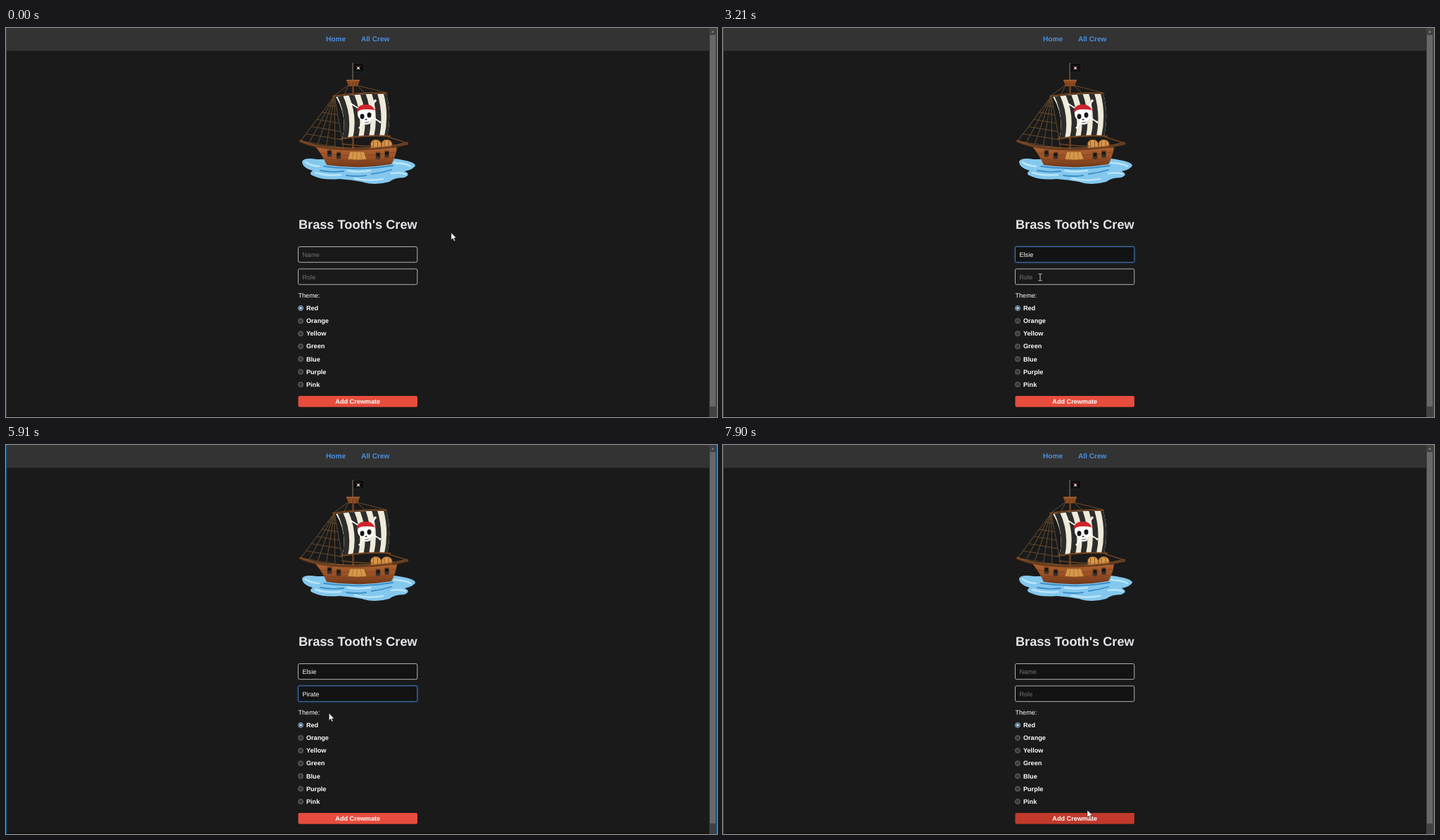
Animation of 1011x554 px, one loop 8 s. Source, as an HTML page:

```html
<!DOCTYPE html>
<html lang="en">
<head>
<meta charset="utf-8">
<title>Crew form</title>
<style>
  html, body { margin: 0; width: 100%; height: 100%; overflow: hidden; background: #1a1a1a; }
  svg { display: block; width: 1011px; height: 554px; }
  text { font: 9.1px "Liberation Sans", Arial, sans-serif; fill: #fff; text-rendering: geometricPrecision; white-space: pre; }
  .bold { font-weight: bold; }
  .nav { font-size: 10.1px; font-weight: bold; fill: #4a90e2; }
  .title { font-size: 18.2px; font-weight: bold; fill: #e4e6eb; }
  .mid { text-anchor: middle; }
  .line { fill: none; stroke-linecap: round; }
</style>
</head>
<body>
<svg viewBox="0 0 1011 554">
  <defs>
    <clipPath id="sailClip"><path d="M469 98Q505 93 541 94Q549 125 542 154Q510 153 478 158Q486 126 469 98Z"/></clipPath>
    <linearGradient id="wood" x2="0" y2="1">
      <stop stop-color="#b0632f"/><stop offset=".5" stop-color="#9b5226"/><stop offset="1" stop-color="#6f3719"/>
    </linearGradient>
    <filter id="glow" x="-10%" y="-40%" width="120%" height="180%"><feGaussianBlur stdDeviation=".8"/></filter>
  </defs>

  <rect width="1011" height="554" fill="#1a1a1a"/>
  <rect width="1000" height="32.5" fill="#333"/>
  <rect y="552.5" width="1000" height="1.5" fill="#111"/>
  <text class="nav" x="455" y="19">Home</text>
  <text class="nav" x="505" y="19">All Crew</text>

  <rect x="1000" width="11" height="554" fill="#424242"/>
  <rect x="1001" y="10" width="8" height="529" fill="#686868"/>
  <path d="M1003 6.5l2-3 2 3z" fill="#858585"/>
  <path id="edge" class="line" d="M.5 0V554M1010.5 0V554"/>

  <g id="ship">
    <path d="M421 190Q424 184 442 187L552 186Q582 190 582 196Q580 201 567 204Q577 209 566 213Q552 213 545 219Q524 225 506 219Q490 216 474 215Q451 217 438 211Q429 208 436 203Q421 199 421 190Z" fill="#84c8ee"/>
    <g class="line" stroke="#b9e6f8" stroke-width="2.4">
      <path d="M426 191Q432 196 445 197M440 206Q456 211 476 209M496 214Q514 219 536 215M548 207Q560 205 568 208M552 192Q570 193 575 197M486 203Q500 206 518 203"/>
    </g>
    <g class="line" stroke="#3d8dc6" stroke-width="1.8">
      <path d="M452 197Q500 204 550 196M447 203Q462 206 480 204M520 208Q535 206 548 202M484 210Q500 212 512 210"/>
    </g>
    <g id="net" class="line" stroke="#5b452b" stroke-width="1.2"></g>
    <path d="M493 50V76" class="line" stroke="#8d7a66"/>
    <path d="M494 51Q500 49 509 51V63Q501 61 494 63Z" fill="#0c0c0c" stroke="#3b3838" stroke-width=".5"/>
    <path d="M498.500 54.500l5 5M503.500 54.500l-5 5" class="line" stroke="#bbb" stroke-width=".7"/>
    <circle cx="501" cy="57" r="1.700" fill="#ddd"/><path d="M499 56q2-3 4 0z" fill="#c22"/>
    <path d="M493.5 80V172" class="line" stroke="#6d4123" stroke-width="2.6"/>
    <path d="M486 82L467 96M500 82L540 92M487 82L480 96M499 82L512 94" class="line" stroke="#6b4c2c"/>
    <path d="M484 74H503L500 83H487Z" fill="#8d4c22"/><path d="M484 74.5H503" stroke="#a9632f" stroke-width="1.6"/>
    <path d="M488 77v5M493 77v6M498 77v5" stroke="#5d2f14" stroke-width=".7"/>
    <g clip-path="url(#sailClip)">
      <rect x="465" y="90" width="85" height="70" fill="#efead9"/>
      <g id="stripes" class="line" stroke="#2d2d2c" stroke-width="7.6"></g>
    </g>
    <path d="M465 97Q502 91 541 93M476 158Q510 152 546 154" class="line" stroke="#75431f" stroke-width="2"/>
    <path d="M491 108L532 134M525 104L503 142" class="line" stroke="#fff" stroke-width="1.8"/>
    <g fill="#fff">
      <circle cx="490.500" cy="108.500" r="1.500"/><circle cx="532" cy="134" r="1.500"/><circle cx="525" cy="103.500" r="1.800"/><circle cx="503" cy="142" r="1.600"/>
      <path d="M500 119Q511 113 523 117Q525 127 519 131L518 136Q512 139 508 136L507 132Q499 130 500 119Z"/>
    </g>
    <path d="M498.500 119Q500 109 511 109Q521 108 524 117Q511 113 498.500 119Z" fill="#d0232a"/>
    <path d="M524 116l3.500-1.500-1.500 3.500z" fill="#a9161c"/>
    <ellipse cx="506.500" cy="126" rx="3" ry="3.700" fill="#151515"/><ellipse cx="516.500" cy="124" rx="3" ry="3.700" fill="#151515"/>
    <path d="M510.500 131l1.500-2 1.500 2zM509.500 134.500q4 1 7-1" fill="#222" stroke="#555" stroke-width=".5"/>
    <g id="barrels"></g>
    <path d="M440 169Q490 177 556 170Q554 184 548 194Q500 202 456 195Q450 181 440 169Z" fill="url(#wood)"/>
    <path d="M447 178Q500 186 553 177M451 186Q500 193 551 185" class="line" stroke="#7b4120" stroke-width=".8"/>
    <path d="M418 161Q440 172 490 173Q540 173 571 165" class="line" stroke="#6a3c1d" stroke-width="2.6"/>
    <path d="M419 160Q440 170 490 171Q540 171 571 163" class="line" stroke="#a5652f" stroke-width=".9"/>
    <path d="M478 165Q510 169 520 168M543 155L571 164" class="line" stroke="#704320" stroke-width="1.4"/>
    <path d="M489 176H509L513 187Q500 189 486 187Z" fill="#d5974a" stroke="#8d5423" stroke-width=".8"/>
    <path d="M494 176l-2 11M499 176v11M504 176l2 11" stroke="#a6672c" stroke-width=".7"/>
    <g id="ports"></g>
  </g>

  <text class="title mid" x="500.3" y="285.5">Brass Tooth's Crew</text>
  <g id="fields"></g>
  <text x="415.5" y="383.5">Theme:</text>
  <g id="radios"></g>
  <rect id="button" x="415.5" y="524" width="169.5" height="15.7" rx="2"/>
  <text class="bold mid" x="500.2" y="535.3">Add Crewmate</text>
  <path id="caret" stroke="#fff" stroke-width=".8"/>

  <g id="arrow"><path d="M0 0V10.2L2.4 8 4.2 12 5.8 11.2 4.1 7.5H7.3Z" fill="#fff" stroke="#111" stroke-width=".5"/></g>
  <g id="beam"><path d="M-2.5-5Q-.5-5 0-4.2Q.5-5 2.5-5M0-4.2V4.2M-2.5 5Q-.5 5 0 4.2Q.5 5 2.5 5" fill="none" stroke="#ddd" stroke-width=".9"/></g>
  <g id="hand"><path d="M-1 0Q0-1 1 0V4L5 5Q6 6 5.5 9L4.5 12H-1.5L-4 7.5Q-3.5 6-1 8Z" fill="#fff" stroke="#111" stroke-width=".6"/></g>
</svg>
<script>
const LOOP = 8000, BLINK = 515;
const $ = id => document.getElementById(id);
const fill = (id, items, draw) => { $(id).innerHTML = items.map(draw).join(''); };
const mix = (a, b, k) => a + (b - a) * k;
const range = n => Array.from({ length: n }, (_, i) => i);

// Ship details
fill('stripes', range(5), i => {
  const k = i / 4;
  return `<path d="M${mix(472, 540, k)} 90Q${mix(491, 550, k)} 126 ${mix(481, 540, k)} 162"/>`;
});
fill('net', range(6), i => {
  const k = i / 5, rung = mix(.2, 1, k);
  return `<path d="M467 97L${mix(419, 480, k)} ${mix(161, 171, k)}"/>` +
    `<path d="M${mix(467, 419, rung)} ${mix(97, 161, rung)}L${mix(467, 480, rung)} ${mix(97, 171, rung)}"/>`;
});
fill('barrels', [525.5, 541], x =>
  `<path d="M${x - 7} 172V164Q${x - 5} 159 ${x} 159Q${x + 6} 159 ${x + 8} 164V172Z" fill="#d8964a" stroke="#7b4a20"/>` +
  `<path d="M${x - 3} 161V171M${x + 3} 161V171" stroke="#8e5a29"/>`);
fill('ports', [[460, 179], [473, 182], [529, 182], [541.5, 180]], ([x, y]) =>
  `<rect x="${x - 3.5}" y="${y - 5.5}" width="7" height="10" rx="1" fill="#71401f"/>` +
  `<rect x="${x - 2.5}" y="${y - 4}" width="5" height="8" rx="1" fill="#171717"/><circle cx="${x}" cy="${y + 2.5}" r="2.3" fill="#343639"/>`);

// Form
const fields = [
  { hint: 'Name', text: 'Elsie', y: 311.5, focus: 660, blur: 3365, keys: [1560, 1840, 1960, 2110, 2390] },
  { hint: 'Role', text: 'Pirate', y: 343.1, focus: 3365, blur: 6570, keys: [4280, 4650, 4770, 5020, 5270, 5390] }
];
const CLEAR = 7470, PICK = 6570;
fill('fields', fields, f => {
  const box = `x="415.5" y="${f.y}" width="169.3" height="22.2" rx="2"`;
  return `<g><rect ${box} fill="none" stroke="#4a90e2" stroke-width="2" filter="url(#glow)"/>` +
    `<rect ${box} stroke-width=".9"/><text x="421.5" y="${f.y + 14.5}"></text></g>`;
});
fields.forEach((f, i) => { [f.glow, f.box, f.label] = $('fields').children[i].children; });

const themes = ['Red', 'Orange', 'Yellow', 'Green', 'Blue', 'Purple', 'Pink'];
fill('radios', themes, (name, i) => {
  const y = 399 + i * 18.13;
  return `<g><circle cx="419" cy="${y}" r="3.5" fill="#3b3b3b" stroke-width=".8"/>` +
    `<circle cx="419" cy="${y}" r="2.1" fill="#a5cdfb"/><text class="bold" x="427" y="${y + 3.1}">${name}</text></g>`;
});
const radios = [...$('radios').children];

// time, shape, x, y
const pointer = [
  [0, 'arrow', 633, 291.5], [150, 'beam', 505, 332], [300, 'beam', 468, 326], [420, 'beam', 455, 323.5], [540, 'beam', 452.5, 323],
  [2850, 'beam', 452.5, 327], [2970, 'arrow', 452, 337], [3090, 'beam', 451, 350], [3210, 'beam', 451, 355], [3330, 'beam', 451, 356.7],
  [5790, 'arrow', 455, 371], [5910, 'arrow', 459.3, 382], [6060, 'arrow', 452, 390], [6180, 'arrow', 438, 402],
  [6300, 'arrow', 425, 411], [6420, 'arrow', 418, 414], [6570, 'arrow', 422, 424], [6690, 'arrow', 440, 455],
  [6810, 'arrow', 470, 502], [6960, 'hand', 495, 527], [7080, 'hand', 505, 529], [7200, 'hand', 509, 529], [7900, 'arrow', 518, 520]
];

function drawFields(t) {
  $('caret').setAttribute('d', '');
  for (const f of fields) {
    const focused = t >= f.focus && t < f.blur;
    const typed = t < CLEAR ? f.text.slice(0, f.keys.filter(k => k <= t).length) : '';
    f.label.textContent = typed || f.hint;
    f.label.style.fill = typed ? '#fff' : '#757575';
    f.glow.style.opacity = focused ? .3 : 0;
    f.box.style.stroke = focused ? '#4484d0' : '#c4c4c4';
    f.box.style.fill = t < f.focus ? '#191919' : '#131313';
    const lastKey = Math.max(f.focus, ...f.keys.filter(k => k <= t));
    if (focused && (t - lastKey) % (2 * BLINK) < BLINK) {
      const x = 421.7 + (typed ? f.label.getComputedTextLength() : 0);
      $('caret').setAttribute('d', `M${x} ${f.y + 6}v10`);
    }
  }
}

function draw(t) {
  $('edge').style.stroke = t < 660 ? '#454545' : '#0b5795';
  drawFields(t);
  const chosen = t >= PICK && t < CLEAR ? 1 : 0;
  radios.forEach((r, i) => {
    r.children[0].style.stroke = i === chosen ? '#a5cdfb' : '#777';
    r.children[1].style.opacity = i === chosen ? 1 : 0;
  });
  const hover = Math.min(1, Math.max(0, (t - 6900) / 250));
  $('button').style.fill = `rgb(${mix(231, 192, hover)},${mix(76, 57, hover)},${mix(60, 43, hover)})`;
  const [, shape, x, y] = pointer.filter(p => p[0] <= t).pop();
  for (const id of ['arrow', 'beam', 'hand']) $(id).style.display = id === shape ? '' : 'none';
  $(shape).setAttribute('transform', `translate(${x} ${y})`);
}

const start = performance.now();
function tick() {
  draw((performance.now() - start) % LOOP);
  requestAnimationFrame(tick);
}
tick();
</script>
</body>
</html>
```
